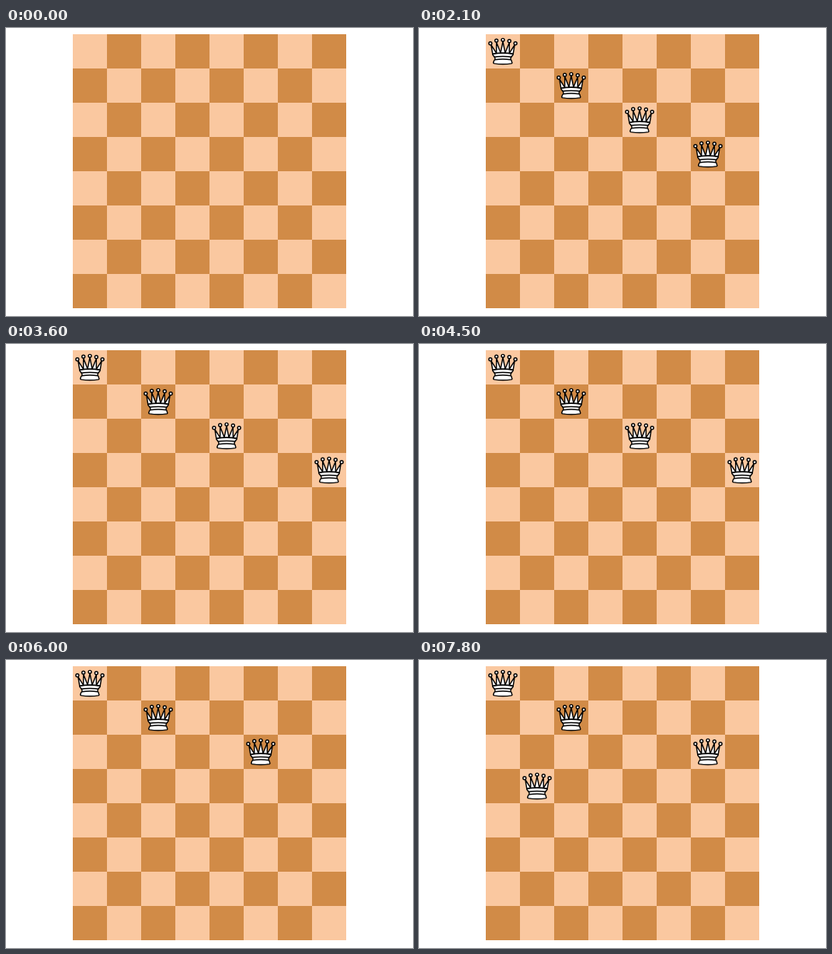
An HTML page with a canvas for the animation above (8 s loop, 524 by 370 pixels).

```html
<!DOCTYPE html>
<html lang="en">
<head>
<meta charset="utf-8">
<title>Queens backtracking</title>
<style>
html, body { margin: 0; width: 100%; height: 100%; overflow: hidden; background: #fff; }
canvas { display: block; }
</style>
</head>
<body>
<canvas id="stage" width="524" height="370"></canvas>
<script>
const ctx = document.getElementById('stage').getContext('2d');
const LOOP = 8000, STEP = 300, CELL = 44, LEFT = 86, TOP = 8;

// One entry per step: queen columns from the top row down.
const states = ['', '0', '02', '024', '0241', '0241', '024', '0246', '02461',
  '024613', '0246', '024', '0247', '02471', '024713', '0247', '02', '025',
  '0251', '02516', '025', '0257', '02571', '02571', '02', '026', '0261'];

// Queen drawn on a 45-unit square
const crown = new Path2D('M9 26C17.5 24.5 30 24.5 36 26L38 14L31 25V11L25.5 24.5L22.5 9.5L19.5 24.5L14 10.5V25L7 14Z');
const base = new Path2D('M9 26C9 28 10.5 28 11.5 30C12.5 31.5 12.5 31 12 33.5C10.5 34.5 10.5 36 10.5 36' +
  'C9 37.5 11 38.5 11 38.5C17.5 39.5 27.5 39.5 34 38.5C34 38.5 35.5 37.5 34 36C34 36 34.5 34.5 33 33.5' +
  'C32.5 31 32.5 31.5 33.5 30C34.5 28 36 28 36 26C27.5 24.5 17.5 24.5 9 26Z');
const bands = new Path2D('M11.5 30C15 29 30 29 33.5 30M12 33.5C18 32.5 27 32.5 33 33.5');
const tips = [[6, 12], [14, 8.5], [22.5, 7.5], [31, 9], [39, 12]].map(([x, y]) => {
  const tip = new Path2D();
  tip.arc(x, y, 2, 0, Math.PI * 2);
  return tip;
});

function drawBoard() {
  ctx.fillStyle = '#fff';
  ctx.fillRect(0, 0, 524, 370);
  for (let row = 0; row < 8; row++) {
    for (let col = 0; col < 8; col++) {
      ctx.fillStyle = (row + col) % 2 ? '#d18b47' : '#fac8a0';
      ctx.fillRect(LEFT + col * CELL, TOP + row * CELL, CELL, CELL);
    }
  }
}

function drawQueen(row, col) {
  ctx.save();
  ctx.translate(LEFT + col * CELL, TOP + row * CELL);
  ctx.scale(CELL / 45, CELL / 45);
  ctx.fillStyle = '#fff';
  ctx.strokeStyle = '#000';
  ctx.lineWidth = 1.5;
  ctx.lineCap = ctx.lineJoin = 'round';
  for (const part of [...tips, crown, base]) {
    ctx.fill(part);
    ctx.stroke(part);
  }
  ctx.stroke(bands);
  ctx.restore();
}

let shown = -1;
const start = performance.now();

function frame() {
  const time = (performance.now() - start) % LOOP;
  const step = Math.floor(time / STEP);
  if (step !== shown) {
    shown = step;
    drawBoard();
    [...states[step]].forEach((col, row) => drawQueen(row, +col));
  }
  requestAnimationFrame(frame);
}
frame();
</script>
</body>
</html>
```
